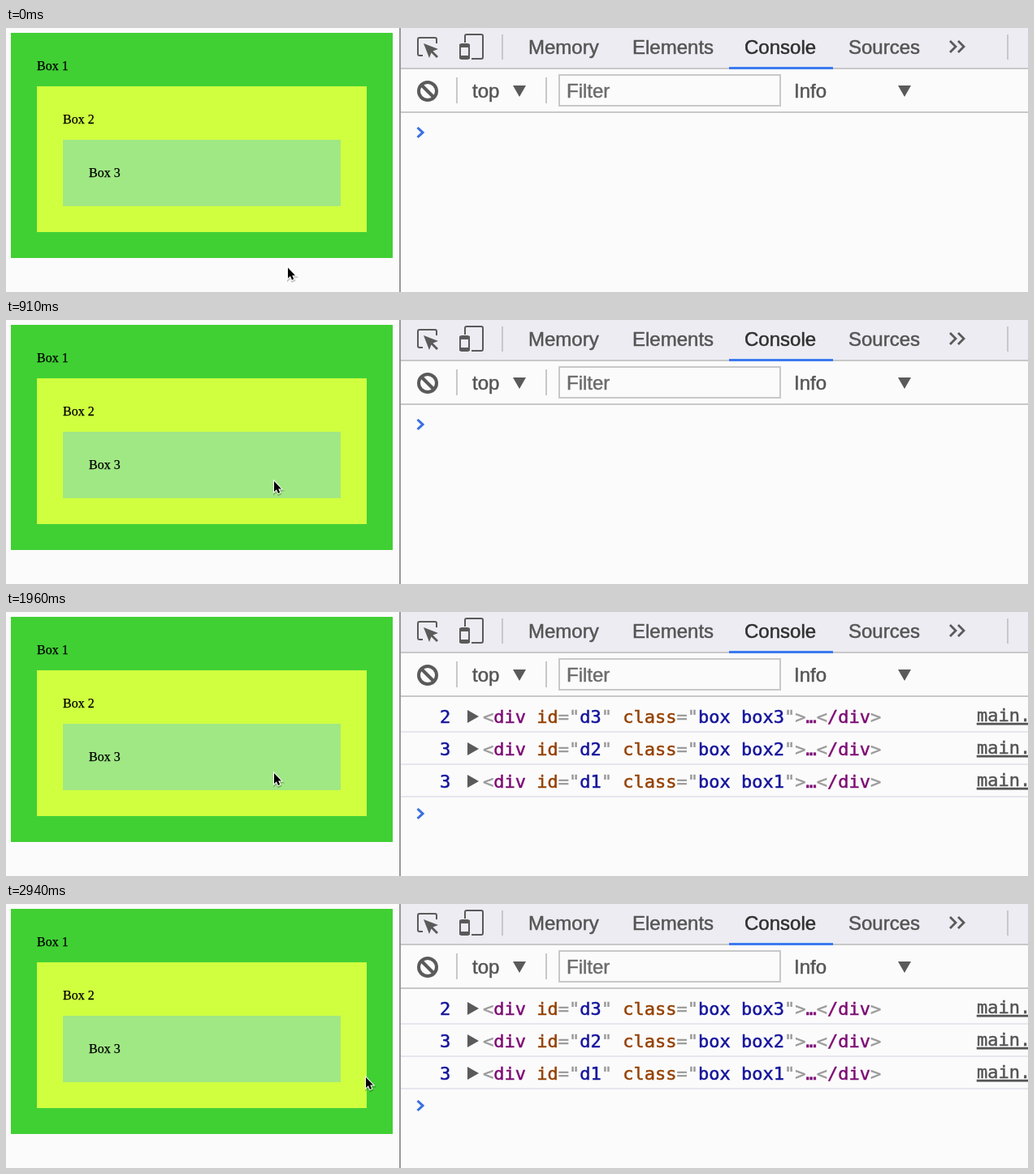
Animation, 1258 px wide and 326 px high, one loop 3.01 s. Source, as an HTML page:

```html
<!DOCTYPE html>
<html lang="en">
<head>
<meta charset="utf-8">
<title>Event order</title>
<style>
  html, body { margin: 0; width: 100%; height: 100%; overflow: hidden; background: #fbfbfb; }
  svg { display: block; }
  text { fill: currentColor; stroke: currentColor; stroke-width: .5px; }
  .page { font: 16px "Liberation Serif", Times, serif; }
  .page text { stroke-width: .25px; }
  .ui { font: 24px "Liberation Sans", Arial, sans-serif; color: #555; }
  .code { font: 22px "DejaVu Sans Mono", Menlo, monospace; white-space: pre; color: #999; }
  .tag { color: #7d0c74; }
  .attr { color: #944000; }
  .val { color: #15159c; }
  .link { color: #545454; text-decoration: underline; }
  .rule { fill: none; stroke: #c8c8c8; stroke-width: 2; }
  .icon { fill: none; stroke: #5a5a5a; stroke-width: 2; }
  .solid { fill: #5a5a5a; }
</style>
</head>
<body>
<svg width="1258" height="326" viewBox="0 0 1258 326">
  <g class="page">
    <rect x="6" y="6" width="470" height="278" fill="#40d034"/>
    <rect x="38" y="72" width="406" height="180" fill="#d0ff40"/>
    <rect x="70" y="138" width="342" height="82" fill="#a0e884"/>
    <text x="38" y="52">Box 1</text>
    <text x="70" y="118">Box 2</text>
    <text x="102" y="184">Box 3</text>
  </g>

  <rect x="486" width="772" height="50" fill="#ececf2"/>
  <path class="rule" d="M486 50H1258M486 104H1258M611 8V39M1233 8V39M555 61V93M665 61V93"/>
  <path d="M485 0V326" stroke="#999" stroke-width="2"/>
  <rect x="890" y="48" width="128" height="3" fill="#3b7af0"/>
  <rect class="rule" x="681" y="58" width="272" height="38"/>

  <path class="icon" d="M513 34H509Q507 34 507 32V14Q507 12 509 12H528Q530 12 530 14V19"/>
  <path class="solid" d="M514 19L532 26L525.5 28.5L532 35L530 37L523.5 30.5L521 37Z"/>
  <path class="icon" d="M565 18V10Q565 8 567 8H585Q587 8 587 10V36Q587 38 585 38H573"/>
  <path class="icon" d="M559 22Q559 20 561 20H568Q570 20 570 22V36Q570 38 568 38H561Q559 38 559 36Z"/>
  <path class="solid" d="M558 20H571V24H558ZM558 34H571V38H558Z"/>
  <path class="icon" d="M1162 16L1169 23L1162 30M1172 16L1179 23L1172 30" style="stroke-width:2.8"/>
  <g class="icon" style="stroke-width:4">
    <circle cx="519" cy="78" r="11"/>
    <path d="M511 70L527 86"/>
  </g>
  <path class="solid" d="M624 71H640L632 85ZM1098 71H1114L1106 85Z"/>

  <g class="ui">
    <text x="643" y="32">Memory</text>
    <text x="771" y="32">Elements</text>
    <text x="909" y="32" color="#303030">Console</text>
    <text x="1037" y="32">Sources</text>
    <text x="574" y="86">top</text>
    <text x="690" y="86" color="#6c6c6c">Filter</text>
    <text x="970" y="86">Info</text>
  </g>

  <g id="log" class="code"></g>
  <path id="prompt" d="M506.5 -6L513 0L506.5 6" fill="none" stroke="#3b6fe0" stroke-width="3"/>
  <g id="cursor">
    <path d="M0 0V13L3 10.2L5 15L7.2 14L5.2 9.4H9Z" transform="translate(.5 1.5)" fill="none" stroke="#0003" stroke-width="3"/>
    <path d="M0 0V13L3 10.2L5 15L7.2 14L5.2 9.4H9Z" stroke="#fff" stroke-width="2" paint-order="stroke"/>
  </g>
</svg>
<script>
const LOOP = 3010, STEP = 70, CLICK = 980;
const start = [347, 296], rest = [330, 199], end = [443, 214];
const get = id => document.getElementById(id);
const log = get('log'), prompt = get('prompt'), cursor = get('cursor');

const span = (kind, text) => `<tspan class="${kind}">${text}</tspan>`;
const attr = (name, value) => ` ${span('attr', name)}="${span('val', value)}"`;

function row(count, n, y) {
  return `<text class="val" x="534" y="${y + 8}">${count}</text>
    <path class="solid" d="M568 ${y - 8}L582 ${y}L568 ${y + 8}Z"/>
    <text x="587" y="${y + 8}">&lt;${span('tag', 'div')}${attr('id', 'd' + n)}${attr('class', 'box box' + n)}&gt;${span('tag', '…')}&lt;${span('tag', '/div')}&gt;</text>
    <text class="link" x="1195" y="${y + 6}">main.js</text>
    <path d="M486 ${y + 19}H1258" stroke="#e6e6f0" stroke-width="2"/>`;
}
log.innerHTML = row(2, 3, 129) + row(3, 2, 169) + row(3, 1, 209);

const mix = (a, b, u) => a.map((v, i) => Math.round(v + (b[i] - v) * u));
const clamp = u => Math.max(0, Math.min(1, u));
const ease = u => u * u * (3 - 2 * u);

function draw(now) {
  const t = Math.floor(now % LOOP / STEP) * STEP;
  const [x, y] = t < 2870
    ? mix(start, rest, ease(clamp(t / 490)))
    : mix(rest, end, t < 2940 ? 0.4 : 1);
  cursor.setAttribute('transform', `translate(${x} ${y})`);
  log.style.display = t < CLICK ? 'none' : '';
  prompt.setAttribute('transform', `translate(0 ${t < CLICK ? 129 : 249})`);
}

let origin;
function tick(now) {
  origin ??= now;
  draw(now - origin);
  requestAnimationFrame(tick);
}
draw(0);
requestAnimationFrame(tick);
</script>
</body>
</html>
```
